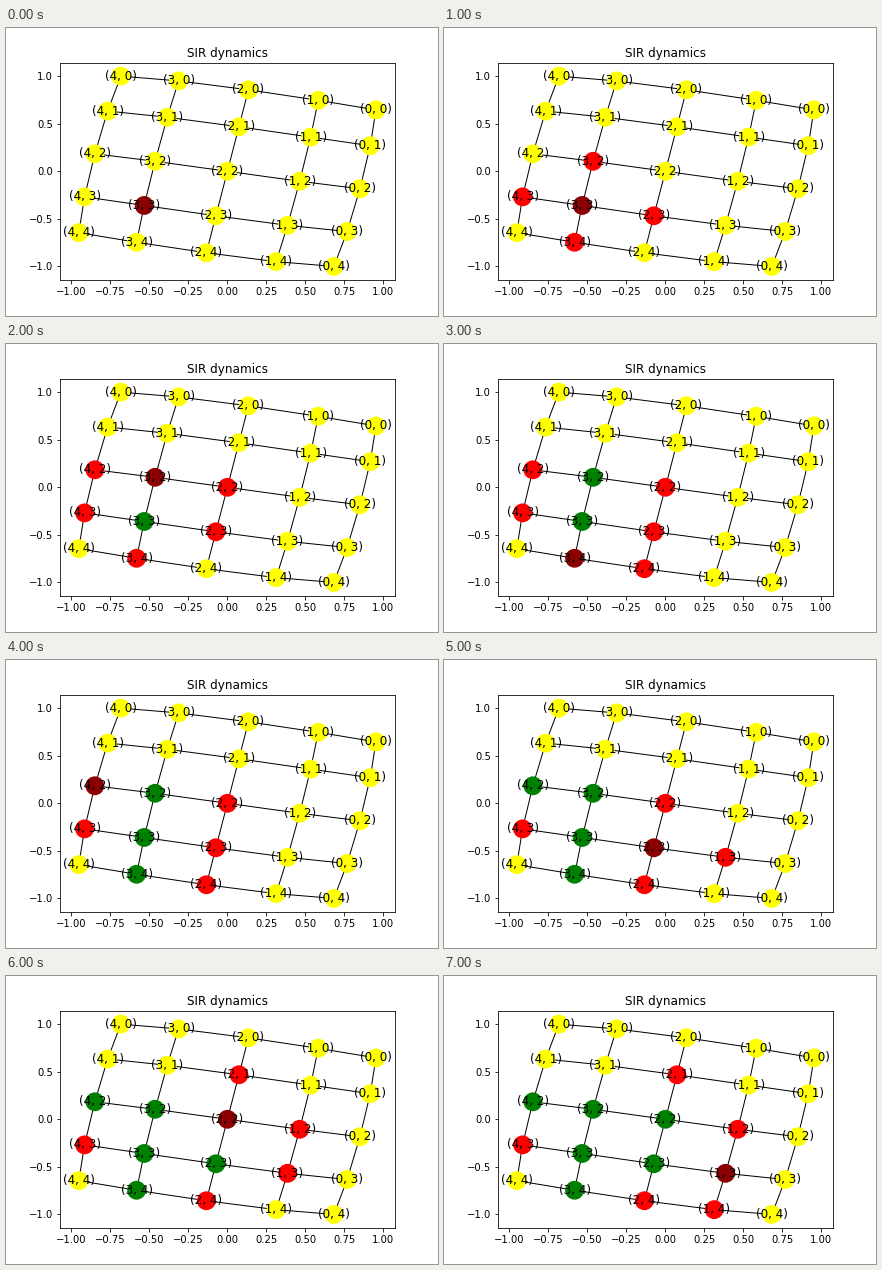
These frames come from a looping animation (432 px wide and 288 px high, 8000 ms). A matplotlib script:

```python
import matplotlib.pyplot as plt
from matplotlib.animation import FuncAnimation

plt.rcParams["font.family"] = "DejaVu Sans"

N = 5
SUSCEPTIBLE, INFECTED, ACTIVE, RECOVERED = "yellow", "red", "darkred", "green"

# Nodes take their turn in this order; resistant ones never catch it.
TURNS = [(3, 3), (3, 2), (3, 4), (4, 2), (2, 3), (2, 2), (1, 3)]
RESISTANT = {(3, 1), (4, 4), (4, 1), (0, 3)}


def place(i, j):
    """Tilted grid, slightly bent and point-symmetric about its centre."""
    u, v = i - N // 2, j - N // 2
    x = u * (-.4764 + .0129 * u**2 + .004 * v**2) - v * (.0762 - .0022 * v**2)
    y = u * (.1094 - .0044 * u**2 - .0008 * v**2) \
        - v * (.4807 - .0132 * v**2 - .0042 * u**2)
    return x, y


pos = {(i, j): place(i, j) for i in range(N) for j in range(N)}


def neighbors(node):
    i, j = node
    around = [(i - 1, j), (i + 1, j), (i, j - 1), (i, j + 1)]
    return [n for n in around if n in pos]


def node_colors(step):
    """The first step shows only the seed; each later one plays a turn."""
    state = dict.fromkeys(pos, SUSCEPTIBLE)
    for active in TURNS[:step]:
        for n in neighbors(active):
            if state[n] == SUSCEPTIBLE and n not in RESISTANT:
                state[n] = INFECTED
        state[active] = RECOVERED
    state[TURNS[max(step - 1, 0)]] = ACTIVE
    return list(state.values())


fig, ax = plt.subplots(figsize=(6, 4), dpi=72)
fig.subplots_adjust(left=.125, right=.9, bottom=.125, top=.88)
ax.set_title("SIR dynamics")
ax.set_xlim(-1.073, 1.073)
ax.set_ylim(-1.142, 1.142)
ax.set_xticks([k / 4 for k in range(-4, 5)])
ax.set_yticks([k / 2 for k in range(-2, 3)])

for node in pos:
    for other in neighbors(node):
        if other > node:
            ax.plot(*zip(pos[node], pos[other]), color="black", lw=1, zorder=1)
dots = ax.scatter(*zip(*pos.values()), s=300, c=node_colors(0),
                  linewidths=1.5, zorder=2)
for node, (x, y) in pos.items():
    ax.text(x, y, str(node), size=12, ha="center", va="center", zorder=3)


def update(step):
    dots.set_color(node_colors(step))
    return [dots]


anim = FuncAnimation(fig, update, frames=len(TURNS) + 1, interval=1000,
                     repeat=True, repeat_delay=0)
plt.show()
```
